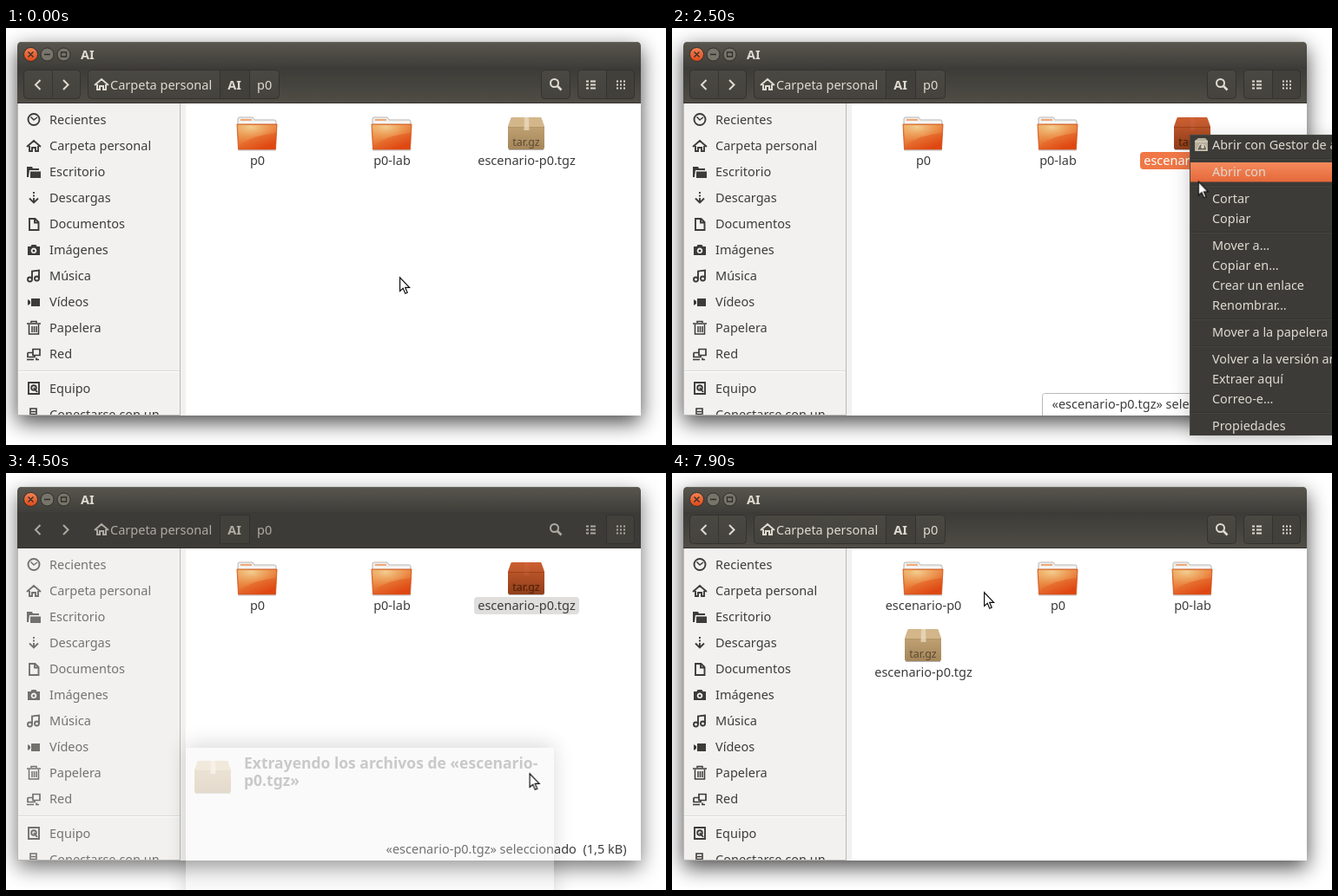
An HTML page for the animation above (8000 ms loop, 760x481 px).

```html
<!DOCTYPE html>
<html lang="es">
<head>
<meta charset="utf-8">
<title>Extraer un archivo</title>
<style>
html, body { margin: 0; width: 100%; height: 100%; overflow: hidden; background: #fff; }
svg { display: block; }
svg text { font: 14.5px "Noto Sans", "Open Sans", sans-serif; fill: #3c3c3c; white-space: pre; }
svg .mid { text-anchor: middle; }
svg .bold { font-weight: 700; }
svg .bar text { fill: #dfdbd2; }
svg .menu text { font-size: 14.4px; fill: #dfdbd2; }
svg .picked { fill: #fff; }
svg .heading { font-size: 17.5px; font-weight: 700; fill: #4c4c4c; }
svg .tag { font-size: 12.4px; fill: #5b4a34; text-anchor: middle; }
.line { fill: none; stroke: #3c3b37; stroke-width: 1.9; }
.light { fill: none; stroke: #dfdbd2; stroke-width: 2; }
.solid { fill: #3c3b37; }
.button { fill: url(#button); stroke: #33322e; }

/* One loop is 8 s, so 1.25% is one 100 ms tick. */
.anim { animation: 8s step-end infinite; }
.before { animation-name: before; }
.after { animation-name: after; }
.hover { animation-name: hover; }
.selected { animation-name: selected; }
.active-label { animation-name: active-label; }
.passive-label { animation-name: backdrop; }
.reselected { animation-name: reselected; }
.status { animation-name: status; }
.status-edge { animation-name: focus; }
.focus { animation-name: focus; }
.dim { animation-name: dim; }
.shade { animation-name: shade; }
.menu { animation-name: menu; }
.mark { animation-name: mark; }
.dialog { animation-name: dialog; }
.cursor { animation-name: cursor; }

@keyframes before { 0% { opacity: 1 } 60%, 100% { opacity: 0 } }
@keyframes after { 0% { opacity: 0 } 60%, 100% { opacity: 1 } }
@keyframes hover { 0% { opacity: 0 } 15% { opacity: .18 } 23.75%, 100% { opacity: 0 } }
@keyframes selected { 0% { opacity: 0 } 23.75%, 100% { opacity: 1 } }
@keyframes active-label { 0% { opacity: 0 } 23.75% { opacity: 1 } 56.25%, 100% { opacity: 0 } }
@keyframes backdrop { 0% { opacity: 0 } 56.25% { opacity: 1 } 60%, 100% { opacity: 0 } }
@keyframes reselected { 0% { opacity: 1 } 87.5%, 100% { opacity: 0 } }
@keyframes status { 0% { opacity: 0 } 25% { opacity: 1 } 90%, 100% { opacity: 0 } }
@keyframes focus { 0% { opacity: 1 } 56.25% { opacity: 0 } 60%, 100% { opacity: 1 } }
@keyframes dim { 0% { opacity: 1 } 56.25% { opacity: .7 } 60%, 100% { opacity: 1 } }
@keyframes shade { 0% { opacity: .72 } 56.25% { opacity: .55 } 60%, 100% { opacity: .72 } }
@keyframes menu {
  0% { opacity: 0 } 23.75% { opacity: .52 } 25% { opacity: .8 } 26.25% { opacity: 1 }
  53.75% { opacity: .8 } 55% { opacity: .4 } 56.25%, 100% { opacity: 0 }
}
@keyframes mark {
  0% { opacity: 0; transform: translateY(155px) }
  31.25% { opacity: 1; transform: translateY(155px) }
  32.5% { opacity: 1; transform: translateY(186px) }
  33.75% { opacity: 1; transform: translateY(209px) }
  35% { opacity: 1; transform: translateY(240px) }
  36.25% { opacity: 1; transform: translateY(286px) }
  37.5% { opacity: 1; transform: translateY(309px) }
  38.75% { opacity: 1; transform: translateY(340px) }
  40% { opacity: 0; transform: translateY(340px) }
  41.25% { opacity: 1; transform: translateY(371px) }
  43.75%, 100% { opacity: 1; transform: translateY(394px) }
}
@keyframes dialog {
  0% { opacity: 0 } 56.25% { opacity: .3 } 57.5% { opacity: .6 }
  58.75% { opacity: .8 } 60%, 100% { opacity: 0 }
}
@keyframes cursor {
  0% { transform: translate(453px, 287px) }
  6.25% { transform: translate(453px, 287px); animation-timing-function: steps(9, start) }
  17.49% { transform: translate(607px, 138px) }
  17.5% { transform: translate(587px, 119px) }
  18.75% { transform: translate(594px, 121px) }
  30% { transform: translate(594px, 121px); animation-timing-function: steps(8, start) }
  39.99% { transform: translate(641px, 343px) }
  40% { transform: translate(650px, 369px) }
  41.25% { transform: translate(650px, 369px); animation-timing-function: steps(3, start) }
  45% { transform: translate(660px, 403px) }
  55% { transform: translate(660px, 403px); animation-timing-function: steps(4, start) }
  60% { transform: translate(545px, 289px) }
  73.75% { transform: translate(541px, 285px) }
  75% { transform: translate(541px, 285px); animation-timing-function: steps(7, start) }
  83.75% { transform: translate(477px, 246px) }
  96.25% { transform: translate(477px, 246px); animation-timing-function: steps(3, start) }
  100% { transform: translate(359px, 137px) }
}
</style>
</head>
<body>
<svg width="760" height="481" viewBox="0 0 760 481">
<defs>
  <linearGradient id="title" x2="0" y2="1"><stop stop-color="#58564e"/><stop offset="1" stop-color="#3e3d39"/></linearGradient>
  <linearGradient id="tools" x2="0" y2="1"><stop stop-color="#3c3b37"/><stop offset="1" stop-color="#504d46"/></linearGradient>
  <linearGradient id="button" x2="0" y2="1"><stop stop-color="#4a4842"/><stop offset="1" stop-color="#45433d"/></linearGradient>
  <linearGradient id="close" x2="0" y2="1"><stop stop-color="#f58455"/><stop offset="1" stop-color="#dc4818"/></linearGradient>
  <linearGradient id="front" x2=".6" y2="1"><stop stop-color="#e8a254"/><stop offset=".5" stop-color="#e87a38"/><stop offset="1" stop-color="#df4712"/></linearGradient>
  <radialGradient id="shine" cx=".35" cy=".1" r=".8"><stop stop-color="#f4dca2" stop-opacity=".8"/><stop offset="1" stop-color="#f0a050" stop-opacity=".15"/></radialGradient>
  <linearGradient id="card" x2="0" y2="1"><stop stop-color="#c9ab7c"/><stop offset="1" stop-color="#a5865a"/></linearGradient>
  <linearGradient id="tint" x2="0" y2="1"><stop stop-color="#cb4d20"/><stop offset="1" stop-color="#8a300e"/></linearGradient>
  <linearGradient id="mark" x2="0" y2="1"><stop stop-color="#f58a5c"/><stop offset="1" stop-color="#e5683a"/></linearGradient>
  <filter id="blur" x="-20%" y="-20%" width="140%" height="140%"><feGaussianBlur stdDeviation="12"/></filter>
  <clipPath id="side"><path d="M14 87H200V446H14Z"/></clipPath>

  <g id="folder">
    <path d="M-22 14V3q0-2 2-2H-5l2 3H20q2 0 2 2V14Z" fill="#efefed" stroke="#b9b7b3"/>
    <path d="M-19 4H-6" stroke="#f0a878" stroke-width="2"/>
    <path d="M-21 7H21" stroke="#fff"/>
    <path d="M-23 9H23L21.5 38H-21.5Z" fill="url(#front)" stroke="#cf4c17" stroke-width=".8"/>
    <path d="M-22 10H22V19Q-2 21-20.5 33Z" fill="url(#shine)"/>
    <path d="M-22 39H22" stroke="#000" stroke-opacity=".25"/>
  </g>
  <path id="carton" d="M-16 1H16q1 0 1.5 1L21 12V36q0 2-2 2H-19q-2 0-2-2V12L-17.500 2q.5-1 1.500-1Z"/>
  <g id="box">
    <use href="#carton" fill="url(#card)"/>
    <path d="M-16 1H16q1 0 1.500 1L21 12H-21L-17.500 2q.5-1 1.500-1Z" fill="#d3b78b"/>
    <path d="M-21 12.500H21" stroke="#b39566"/>
    <path d="M-2 1H3L3.500 16H-2.500Z" fill="#ead8bb" opacity=".8"/>
    <path d="M-20 38.500H20" stroke="#000" stroke-opacity=".3"/>
  </g>
  <g id="tinted">
    <use href="#carton" fill="url(#tint)" opacity=".84"/>
    <path d="M-20.500 12.500H20.500" stroke="#8d3310" opacity=".5"/>
    <text class="tag" y="34" style="fill:#4d2109">tar.gz</text>
  </g>
  <path id="home" d="M-8 1 0-6 8 1M-5 0V6H-2V2H2V6H5V0"/>
</defs>

<rect width="760" height="481" fill="#fff"/>
<rect class="anim shade" x="13" y="24" width="718" height="431" filter="url(#blur)"/>

<!-- window frame -->
<path d="M13 447V21q0-5 5-5H726q5 0 5 5V447Z" fill="#fff"/>
<path d="M13 46V21q0-5 5-5H726q5 0 5 5V46Z" fill="url(#title)"/>
<path d="M18 16.500H726" stroke="#6b6960"/>
<rect x="13" y="45" width="718" height="42" fill="#3c3b37"/>
<rect class="anim focus" x="13" y="45" width="718" height="42" fill="url(#tools)"/>
<path d="M13 86.500H731" stroke="#33322e"/>
<g stroke="#2f2e2a">
  <circle cx="28.500" cy="30.500" r="8" fill="url(#close)"/>
  <circle cx="47.500" cy="30.500" r="7.500" fill="#77746a"/>
  <circle cx="66.500" cy="30.500" r="7.500" fill="#77746a"/>
  <path d="M25.500 27.500l6 6m0-6-6 6M44 30.500h7M63.500 28h6v5h-6Z" fill="none" stroke-width="1.300"/>
</g>

<!-- toolbar -->
<g class="anim focus">
  <rect class="button" x="20.500" y="48.500" width="65" height="33" rx="4"/>
  <rect class="button" x="94.500" y="48.500" width="220" height="33" rx="4"/>
  <rect class="button" x="616.500" y="48.500" width="33" height="33" rx="4"/>
  <rect class="button" x="658.500" y="48.500" width="65" height="33" rx="4"/>
  <path d="M53.500 49v32" stroke="#37362f"/>
</g>
<path d="M246.500 48.500h34v33h-34ZM691.500 48.500h28q4 0 4 4v25q0 4-4 4h-28Z" fill="#42403b" stroke="#33322e"/>
<g class="bar">
  <text class="bold" x="86" y="36">AI</text>
  <g class="anim dim">
    <path class="light" d="M39.500 60l-5.500 5.500 5.500 5.500M66 60l5.500 5.500-5.500 5.500"/>
    <use href="#home" class="light" x="110" y="65"/>
    <text x="120" y="71">Carpeta personal</text>
    <text class="bold mid" x="263" y="71">AI</text>
    <text x="289" y="71">p0</text>
    <circle class="light" cx="631.500" cy="63.500" r="4.500"/>
    <path class="light" d="M635 67l4.500 4.500" style="stroke-width:2.600"/>
    <path class="light" d="M668 61.500h3m2 0h6M668 65.500h3m2 0h6M668 69.500h3m2 0h6"/>
    <path class="light" d="M703 61.500h10M703 65.500h10M703 69.500h10" stroke-dasharray="2"/>
  </g>
</g>

<!-- sidebar -->
<rect x="13" y="87" width="194" height="360" fill="#f2f1f0"/>
<path d="M13.500 87V446.500H200.500V87" fill="none" stroke="#bab8b5"/>
<path d="M14 395.500H200" stroke="#dcdad7"/>
<path d="M14 396.500H200" stroke="#fff"/>
<g class="anim dim" clip-path="url(#side)">
  <text x="50" y="111">Recientes</text>
  <text x="50" y="141">Carpeta personal</text>
  <text x="50" y="171">Escritorio</text>
  <text x="50" y="201">Descargas</text>
  <text x="50" y="231">Documentos</text>
  <text x="50" y="261">Imágenes</text>
  <text x="50" y="291">Música</text>
  <text x="50" y="321">Vídeos</text>
  <text x="50" y="351">Papelera</text>
  <text x="50" y="381">Red</text>
  <text x="50" y="421">Equipo</text>
  <text x="50" y="451">Conectarse con un</text>
  <g class="line">
    <circle cx="32" cy="105.500" r="6.500"/>
    <path d="M28.500 102.500l3.500 3.500 4-3" stroke-width="1.500"/>
    <use href="#home" x="32" y="136"/>
    <path d="M32 189v2m0 1.500v2m0 1.500v5M27 196.500l5 5 5-5"/>
    <path d="M27 220h6.500l4 4v9H27ZM33 220v4.500h4.500"/>
    <path d="M30 290V280.500l8-1V289"/>
    <circle cx="27.500" cy="290" r="2.500"/><circle cx="35.500" cy="289" r="2.500"/>
    <path d="M24 341h16M29 340v-1.500h6v1.500M26.500 342v11h11v-11M30 344v7m2.500-7v7m2.500-7v7" stroke-width="1.500"/>
    <path d="M31 370.500h8v7h-8ZM25 374.500h6m-6 0v5h8v-2M24 382.500h8m3-2v2h3" stroke-width="1.700"/>
    <path d="M26 409h12v13H26Z"/>
    <circle cx="32" cy="415" r="2.800"/><path d="M32 415l4 5"/>
    <path d="M28 439h7v12h-7ZM29 442.500h5m-5 3h5" stroke-width="1.600"/>
  </g>
  <path class="solid" d="M24 160h6l1 2h7v2H27l-1 8h-2ZM28 165.500h12V173H28Z"/>
  <path class="solid" fill-rule="evenodd" d="M25 252h3.500l1-2h5l1 2H39v10H25ZM32 253.500a3.300 3.300 0 1 0 .01 0M32 255.500a1.500 1.500 0 1 1-.01 0"/>
  <path class="solid" d="M29 312h10v9H29ZM25 313l3 2v3l-3 2Z"/>
</g>

<!-- first arrangement -->
<g class="anim before">
  <use href="#folder" x="289" y="102"/>
  <text class="mid" x="289.500" y="158">p0</text>
  <use href="#folder" x="444" y="102"/>
  <text class="mid" x="444.500" y="158">p0-lab</text>
  <g transform="translate(599 102)">
    <use href="#box"/>
    <text class="tag" y="34">tar.gz</text>
    <use class="anim hover" href="#carton" fill="#fff"/>
    <use class="anim selected" href="#tinted"/>
    <rect class="anim passive-label" x="-60" y="41" width="121" height="20" rx="4" fill="#dfdedd"/>
    <text class="mid" x=".5" y="56">escenario-p0.tgz</text>
    <g class="anim active-label">
      <rect x="-60" y="41" width="121" height="20" rx="4" fill="#f07746"/>
      <text class="mid picked" x=".5" y="56">escenario-p0.tgz</text>
    </g>
  </g>
</g>

<!-- arrangement with the extracted folder -->
<g class="anim after">
  <use href="#folder" x="289" y="102"/>
  <text class="mid" x="289.500" y="158">escenario-p0</text>
  <use href="#folder" x="444" y="102"/>
  <text class="mid" x="444.500" y="158">p0</text>
  <use href="#folder" x="599" y="102"/>
  <text class="mid" x="599.500" y="158">p0-lab</text>
  <g transform="translate(289 179)">
    <use href="#box"/>
    <text class="tag" y="34">tar.gz</text>
    <text class="mid" x=".5" y="56">escenario-p0.tgz</text>
    <g class="anim reselected">
      <use href="#tinted"/>
      <rect x="-60" y="41" width="121" height="20" rx="4" fill="#f28558"/>
      <text class="mid picked" x=".5" y="56">escenario-p0.tgz</text>
    </g>
  </g>
</g>

<g class="anim status">
  <path class="anim status-edge" d="M426.500 447V424.500q0-3 3-3H731V447" fill="#fff" stroke="#bcbab7"/>
  <text x="437.500" y="439">«escenario-p0.tgz» seleccionado  (1,5 kB)</text>
</g>

<g class="anim dialog">
  <rect x="207" y="313" width="424" height="220" opacity=".5" filter="url(#blur)"/>
  <rect x="207" y="317" width="424" height="164" fill="#f2f1f0"/>
  <use href="#box" x="238" y="331"/>
  <text class="heading" x="274" y="341">Extrayendo los archivos de «escenario-</text>
  <text class="heading" x="274" y="361">p0.tgz»</text>
</g>

<g class="anim menu">
  <rect x="598" y="132" width="300" height="338" opacity=".25" filter="url(#blur)"/>
  <rect x="596" y="123" width="170" height="347" fill="#3c3b37"/>
  <path d="M596.500 470V123.500H760" fill="none" stroke="#4c4a45"/>
  <path d="M597 150.500H760M597 181.500H760M597 235.500H760M597 335.500H760M597 366.500H760M597 443.500H760" stroke="#34332f"/>
  <path d="M597 151.500H760M597 182.500H760M597 236.500H760M597 336.500H760M597 367.500H760M597 444.500H760" stroke="#45443f"/>
  <rect class="anim mark" x="597" width="170" height="22.500" fill="url(#mark)"/>
  <path d="M602 130l4-3h8l3 3v12h-15Z" fill="#b7ae9c"/>
  <path d="M602 131h15M604 141l4-7 6 1 2 6Z" fill="#6d6557" stroke="#e2dccd"/>
  <circle cx="611" cy="137" r="2" fill="#ddd5c2"/>
  <text x="622" y="140">Abrir con Gestor de archivadores</text>
  <text x="622" y="171">Abrir con</text>
  <text x="622" y="202">Cortar</text>
  <text x="622" y="225">Copiar</text>
  <text x="622" y="256">Mover a…</text>
  <text x="622" y="279">Copiar en…</text>
  <text x="622" y="302">Crear un enlace</text>
  <text x="622" y="325">Renombrar…</text>
  <text x="622" y="356">Mover a la papelera</text>
  <text x="622" y="387">Volver a la versión anterior…</text>
  <text x="622" y="410">Extraer aquí</text>
  <text x="622" y="433">Correo-e…</text>
  <text x="622" y="464">Propiedades</text>
</g>

<path class="anim cursor" d="M.6.8V16.500L4.200 13.200 6.800 19.200 9.200 18.200 6.700 12.300H11.600Z" fill="#fff" stroke="#111" stroke-width="1.200"/>
</svg>
</body>
</html>
```
